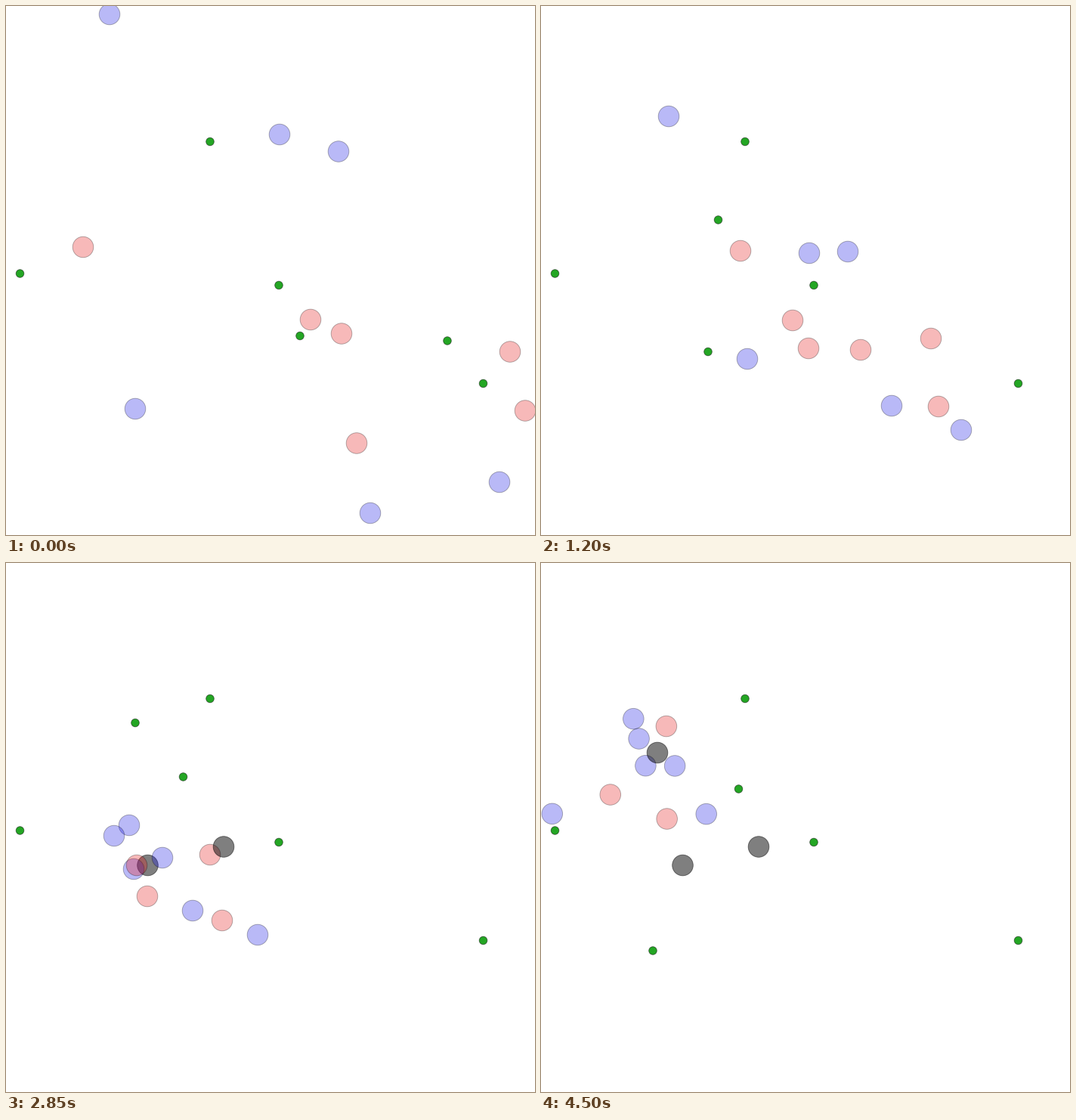
Write a matplotlib script that moves like this. It is 700 px wide and 700 px high and loops after 4.65 s.

```python
import numpy as np
import matplotlib.pyplot as plt
from matplotlib.animation import FuncAnimation
from matplotlib.patches import Circle

SIZE, DPI = 700, 100
FRAMES, STEP = 31, 150
TURNS = (4, 8, 19, 26)       # steps at which a creature changes course
DRAG, PULL = 0.47, (-28, 0)  # closing drift: damped momentum and a pull left
BITE = 16                    # prey this close eats a piece of food

BLUE, RED, GREEN = (0.09, 0.09, 0.9), (0.9, 0.09, 0.09), (0.14, 0.65, 0.14)


class Creature:
    """Cruises straight at first, then curves through its way points."""

    def __init__(self, color, start, speed, *way, died=None):
        self.color, self.died = color, died
        cruise = np.add(start, np.multiply(speed, TURNS[0]))
        t, p = [0, *TURNS[:len(way) + 1]], [start, cruise, *way]
        if died:
            t[-1] = died
        else:
            momentum = np.subtract(p[-1], p[-2]) / (t[-1] - t[-2])
            rest = FRAMES - 1 - t[-1]
            t.append(FRAMES - 1)
            p.append(p[-1] + DRAG * rest * momentum + PULL)
        self.t, self.p = np.array(t, float), np.array(p, float)
        h = np.diff(self.t)[:, None]
        d = np.diff(self.p, axis=0) / h
        mid = (h[1:] * d[:-1] + h[:-1] * d[1:]) / (h[1:] + h[:-1])
        self.v = np.vstack([d[:1], mid, d[-1:]])

    def at(self, n):
        n = min(n, self.t[-1])
        i = min(np.searchsorted(self.t, n, side="right"), len(self.t) - 1) - 1
        h = self.t[i + 1] - self.t[i]
        u = (n - self.t[i]) / h
        return ((1 + 2 * u) * (1 - u) ** 2 * self.p[i]
                + u * (1 - u) ** 2 * h * self.v[i]
                + u * u * (3 - 2 * u) * self.p[i + 1]
                + u * u * (u - 1) * h * self.v[i + 1])

    def dead(self, n):
        return self.died is not None and n >= self.died


# bottom to top
creatures = [
    Creature(RED, (464, 578.5), (0, -17.2), (423, 455), (187, 441), (134, 335)),
    Creature(RED, (667, 457.5), (-17.2, 0), (516, 440), (270, 386), (210, 252)),
    Creature(RED, (687, 535.5), (-17.2, 0), (526, 530), (286, 473), (214, 367)),
    Creature(RED, (102, 319), (17.2, 0), (264, 324), (288, 375.5), died=12),
    Creature(RED, (444, 433.5), (-16.2, -0.9), (333, 416), (187.5, 400),
             died=17),
    Creature(BLUE, (137, 11), (1.8, 15.4), (169, 146), (163, 347), (153, 236)),
    Creature(BLUE, (362, 170), (0, 17), (355, 327), (207, 390), (175, 294)),
    Creature(BLUE, (440, 192.5), (0, 17.2), (406, 325), (143, 361), (64, 338)),
    Creature(BLUE, (171, 533), (14, -3.1), (273, 467), (169, 405), (160, 269)),
    Creature(BLUE, (653, 630), (-6, -11), (556, 561), (333, 492), (265, 366)),
    Creature(BLUE, (482, 671), (0, -17.2), (464, 529), (247, 460), (214, 309)),
    Creature(RED, (403, 415), (-4.4, 6.9), (354, 453), (173, 400), (154, 251),
             died=25),
]


def graze():
    """Food positions at each step; an eaten piece regrows elsewhere."""
    food = [(270, 179.5), (18.5, 354), (361, 369.5), (631.5, 499.5),
            (389, 436.5), (584, 443)]
    regrow = iter([(234.5, 283), (221, 457.5), (171, 211.5), (148, 513),
                   (261.5, 299)])
    history = []
    for n in range(FRAMES):
        mouths = [c.at(n) for c in creatures
                  if c.color == RED and not c.dead(n)]
        for i, spot in enumerate(food):
            if any(np.hypot(*(m - spot)) < BITE for m in mouths):
                food[i] = next(regrow, spot)
        history.append(list(food))
    return history


meals = graze()

fig = plt.figure(figsize=(SIZE / DPI, SIZE / DPI), dpi=DPI, facecolor="white")
ax = fig.add_axes([0, 0, 1, 1])
ax.set_xlim(0, SIZE)
ax.set_ylim(SIZE, 0)
ax.axis("off")


def disc(radius, z):
    return ax.add_patch(Circle((0, 0), radius, linewidth=0.65, zorder=z))


def paint(patch, center, color, fill, edge):
    patch.center = center
    patch.set_facecolor((*color, fill))
    patch.set_edgecolor((0, 0, 0, edge))


food_discs = [disc(5.3, 1) for _ in meals[0]]
discs = [disc(13.8, 2 + i) for i in range(len(creatures))]


def draw(n):
    for spot, patch in zip(meals[n], food_discs):
        paint(patch, spot, GREEN, 1, 0.5)
    for c, patch in zip(creatures, discs):
        if c.dead(n):
            paint(patch, c.at(n), (0, 0, 0), 0.5, 0.5)
        else:
            paint(patch, c.at(n), c.color, 0.3, 0.3)
    return food_discs + discs


anim = FuncAnimation(fig, draw, frames=FRAMES, interval=STEP, repeat=True,
                     repeat_delay=0, blit=False)
plt.show()
```
